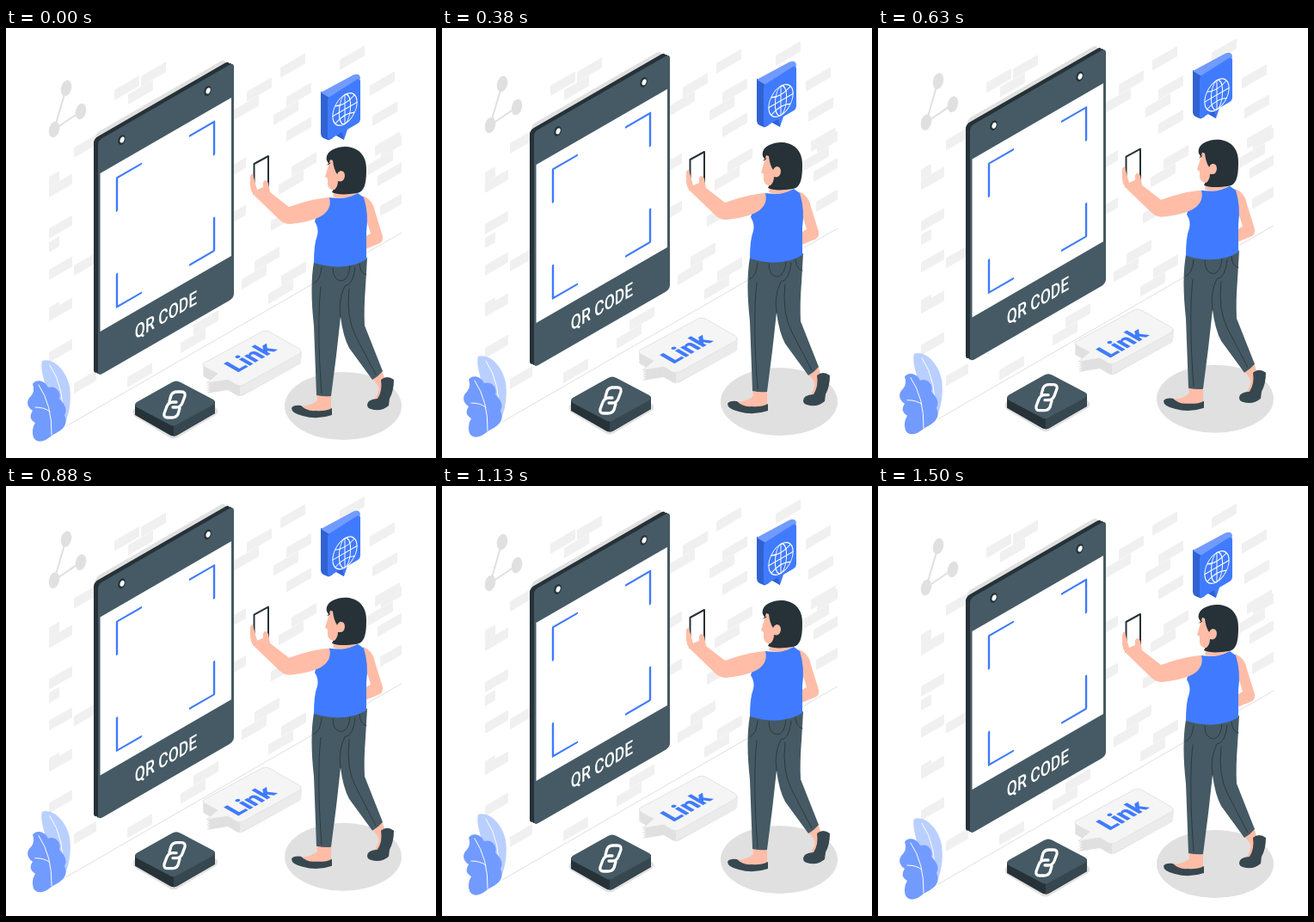
Write an HTML page that moves like this. It is 500 by 500 pixels and loops after 1.54 s.

```html
<!DOCTYPE html>
<html lang="en">
<head>
<meta charset="utf-8">
<title>Poster scan</title>
<style>
html, body { margin: 0; width: 100%; height: 100%; overflow: hidden; background: #fff; }
svg { display: block; width: 100vw; height: 100vh; }
text { font-family: Roboto, Inter, sans-serif; }
.line { fill: none; stroke-linecap: round; stroke-linejoin: round; }
.skin { fill: #ffbda7; }
.dark { fill: #263238; }
.shade { fill: #37474f; }
.slate { fill: #455a64; }
.blue { fill: #407bff; }
.white { stroke: #fff; }
.ink { stroke: #263238; }
</style>
</head>
<body>
<svg viewBox="0 -1 500 500">
  <defs>
    <path id="link" class="line white" stroke-width="3.3" d="M-6-4L-4-11Q-2-15 3-15H8Q13-15 12-10L9-2Q7 3 2 3H-2"/>
    <path id="outline" d="M231 388L298 352Q302 350 306 352L341 372Q345 375 341 378L276 414Q272 416 268 414L258 408L233 412L246 401L231 393Q227 390 231 388Z"/>
    <ellipse id="hole" rx="4" ry="6" transform="rotate(20)"/>
    <ellipse id="dot" rx="6" ry="9.5" transform="rotate(14)"/>
  </defs>

  <g data-lift="10">
    <g id="bricks" fill="#f0f0f0"></g>
    <g fill="#e0e0e0">
      <path class="line" d="M70 69L56 117L87 96" stroke="#e0e0e0" stroke-width="2"/>
      <use href="#dot" x="70" y="69"/>
      <use href="#dot" x="56" y="117"/>
      <use href="#dot" x="87" y="96"/>
      <path d="M70 462L460 237" stroke="#e0e0e0"/>
    </g>
  </g>

  <g data-lift="20">
    <g transform="translate(107 130) skewY(-30)">
      <rect x="-3" y="-10" width="151" height="270" rx="5" fill="#e0e0e0"/>
      <rect class="dark" x="-5" y="-5" width="158" height="274" rx="5"/>
      <rect class="dark" x="-2" y="-2" width="158" height="274" rx="5"/>
      <rect class="slate" width="158" height="274" rx="5"/>
      <rect x="2.5" y="39.5" width="152.5" height="184" fill="#fff"/>
      <path class="line" stroke="#407bff" stroke-width="2.4"
        d="M22 94V56H50M107 56H135V94M22 168V206H50M107 206H135V168"/>
      <text transform="translate(79 256) scale(.78 1)" text-anchor="middle"
        font-size="22.5" font-weight="500" fill="#fff">QR CODE</text>
    </g>
    <g transform="translate(134.5 129)"><use href="#hole" class="dark"/><use href="#hole" x="1" transform="scale(.6)" fill="#fff"/></g>
    <g transform="translate(234.5 72)"><use href="#hole" class="dark"/><use href="#hole" x="1" transform="scale(.6)" fill="#fff"/></g>
  </g>

  <g data-lift="10">
    <path fill="#b9cfff" d="M42 386C54 382 70 396 74 416C77 438 71 456 66 464L46 440C52 420 38 400 42 386Z"/>
    <path class="line white" d="M51 391Q69 417 66 460"/>
    <path fill="#729bff" d="M31 413C34 407 45 408 49 417C58 414 65 423 62 430Q73 441 68 449C74 463 62 468 53 473C42 483 34 480 32 475Q29 466 34 458Q25 453 31 444C23 439 24 431 29 427Q34 421 31 413Z"/>
    <path class="line white" d="M38 414Q54 438 53 472M34 440Q45 440 51 445"/>

    <path fill="#e0e0e0" d="M150 441Q145 446 150 451L190 475Q195 478 200 475L244 449Q249 444 243 440L198 416Z"/>
    <path class="dark" d="M150 437V449L190 472Q195 475 200 472L243 447V433L196 425Z"/>
    <path class="shade" d="M195 461V474L243 447V434Z"/>
    <path class="slate" d="M152 434L193 411Q198 408 203 411L241 431Q245 434 241 437L199 460Q195 463 190 460L152 440Q148 437 152 434Z"/>
    <g transform="translate(196 437)"><use href="#link"/><use href="#link" transform="rotate(180)"/></g>
  </g>

  <g data-lift="30">
    <g id="thickness" fill="#e0e0e0"></g>
    <path d="M272 415V427L341 390Q344 388 344 375Z" fill="#ebebeb"/>
    <use href="#outline" fill="#f5f5f5" stroke="#e0e0e0" stroke-width=".8"/>
  </g>
  <g data-lift="20">
    <text transform="matrix(.866 -.5 .866 .5 269 400)" font-size="28" font-weight="900" class="blue">Link</text>
  </g>

  <g data-lift="10">
    <ellipse cx="392" cy="438.5" rx="68" ry="39.5" fill="#e0e0e0"/>
    <g class="skin">
      <path d="M415 194Q427 199 429 212L438 241Q439 248 433 250L416 257Q412 249 416 245Q418 241 424 238L417 215Z"/>
      <path d="M361 424H378V444L358 446L342 439Q356 438 362 432Z"/>
      <path d="M424 404L437 396L442 412L437 430L427 433Q436 421 432 414Z"/>
    </g>
    <path class="slate" d="M358 271Q390 280 420 266L418 300Q416 325 417 345L438 398Q433 404 426 408L399 371Q392 358 389 335L384 380L378 427Q370 428 361 426L358 345Q353 300 358 271Z"/>
    <path class="shade" d="M332 441Q334 437 343 438Q350 445 360 444Q371 445 379 441V449Q362 455 345 450Q332 447 332 441Z"/>
    <path class="shade" d="M420 437Q420 431 432 430Q438 421 436 408Q443 402 451 408Q451 421 446 430L445 438Q436 446 424 442Q420 441 420 437Z"/>
    <path class="line ink" stroke-width=".8" d="M389 335Q386 315 394 299Q404 298 406 277M380 278Q380 293 391 293Q399 290 400 276M358 296Q366 292 367 277M411 273Q412 285 419 286M399 302Q395 335 407 358L430 402M366 300Q361 345 367 424"/>
    <path class="blue" d="M376 196Q394 199 409 191L416 196Q422 215 419 236V268Q394 283 358 272Q358 250 362 240Q364 232 359 224L362 214Z"/>
    <path class="skin" d="M383 181H407L408 191Q394 200 380 195Z"/>
    <path class="dark" d="M373 153C371 143 382 137 396 137C412 138 420 150 419 165C419 181 416 190 408 191C396 193 384 193 379 190L386 176Z"/>
    <path class="skin" d="M377 152L371 172L374 174V181Q376 188 382 187Q386 183 386 177Q393 179 394 171Q394 165 389 165Q386 166 385 169Q381 163 380 153Z"/>
    <path class="line ink" d="M374 158L377 156"/>
    <path class="ink" d="M288.5 157L305 148V184L288.5 192Z" fill="#fff" stroke-width="2" stroke-linejoin="round"/>
    <path class="skin" d="M376 196C360 197 344 202 329 207L307 190L305 179Q301 173 299 179V184L292 187L287 169Q283 168 284 178Q283 189 290 195L315 219Q322 227 330 227Q350 225 362 220Q380 212 376 196Z"/>
  </g>

  <g data-lift="30">
    <path fill="#3062d4" d="M366 73L380 76V127L375 129.5L369 127Q366 125 366 122Z"/>
    <path fill="#729bff" d="M366 74L404 53.5Q412 51 412 58L376 80Z"/>
    <path class="blue" d="M378 78L408 59Q412 57 412 61V105Q412 108 409 110L397 117L393 129L384 124L378 128Q374 130 374 126V84Q374 80 378 78Z"/>
    <path fill="#3062d4" d="M384 124L393 129L391 120Z"/>
  </g>
  <g data-lift="20">
    <g transform="matrix(.83 -.48 0 1 394 93.5)" class="line white" stroke-width="1.2">
      <circle r="17"/>
      <ellipse rx="8" ry="17"/>
      <path d="M0-17V17M-17 0H17M-13-10Q0-4 13-10M-13 10Q0 4 13 10"/>
    </g>
  </g>
</svg>
<script>
const byId = id => document.getElementById(id);

const brick = (x, y, width = 29) =>
  `<rect width="${Math.min(width, 460 - x)}" height="12" rx="1" transform="translate(${x} ${y}) skewY(-30)"/>`;
const repeat = (count, make) => Array.from({ length: count }, (_, i) => make(i)).join('');
// Two courses in running bond, half a brick apart
const bond = ([x, y]) => brick(x, y) + brick(x - 15, y + 21);

byId('bricks').innerHTML =
  repeat(5, i => brick(50, 184 + 48 * i, 27)) +
  repeat(3, i => brick(50, 172 + 76 * i, 12) + brick(79, 138 + 137 * i, 26)) +
  repeat(5, i => brick(423 + 3 * i, 66 + 35 * i)) +
  repeat(2, i => brick(264, 158 + 55 * i, 15)) +
  [[157, 55], [280, 73], [326, 79], [332, 160], [436, 137], [289, 270], [320, 287], [218, 344]].map(bond).join('') +
  brick(126, 71) + brick(319, 45) + brick(388, 36) + brick(326, 119) + brick(308, 223) + brick(141, 405);

byId('thickness').innerHTML = repeat(5, i => `<use href="#outline" y="${12 - 3 * i}"/>`);

const LOOP = 1540, STEPS = 37;
const layers = [...document.querySelectorAll('[data-lift]')];

// Every layer rises and sinks at constant speed, each to its own height
function draw(now) {
  const step = Math.floor(now % LOOP / LOOP * STEPS);
  const rise = 1 - Math.abs(2 * step / (STEPS - 1) - 1);
  for (const g of layers) g.setAttribute('transform', `translate(0 ${-g.dataset.lift * rise})`);
  requestAnimationFrame(draw);
}
draw(performance.now());
</script>
</body>
</html>
```
